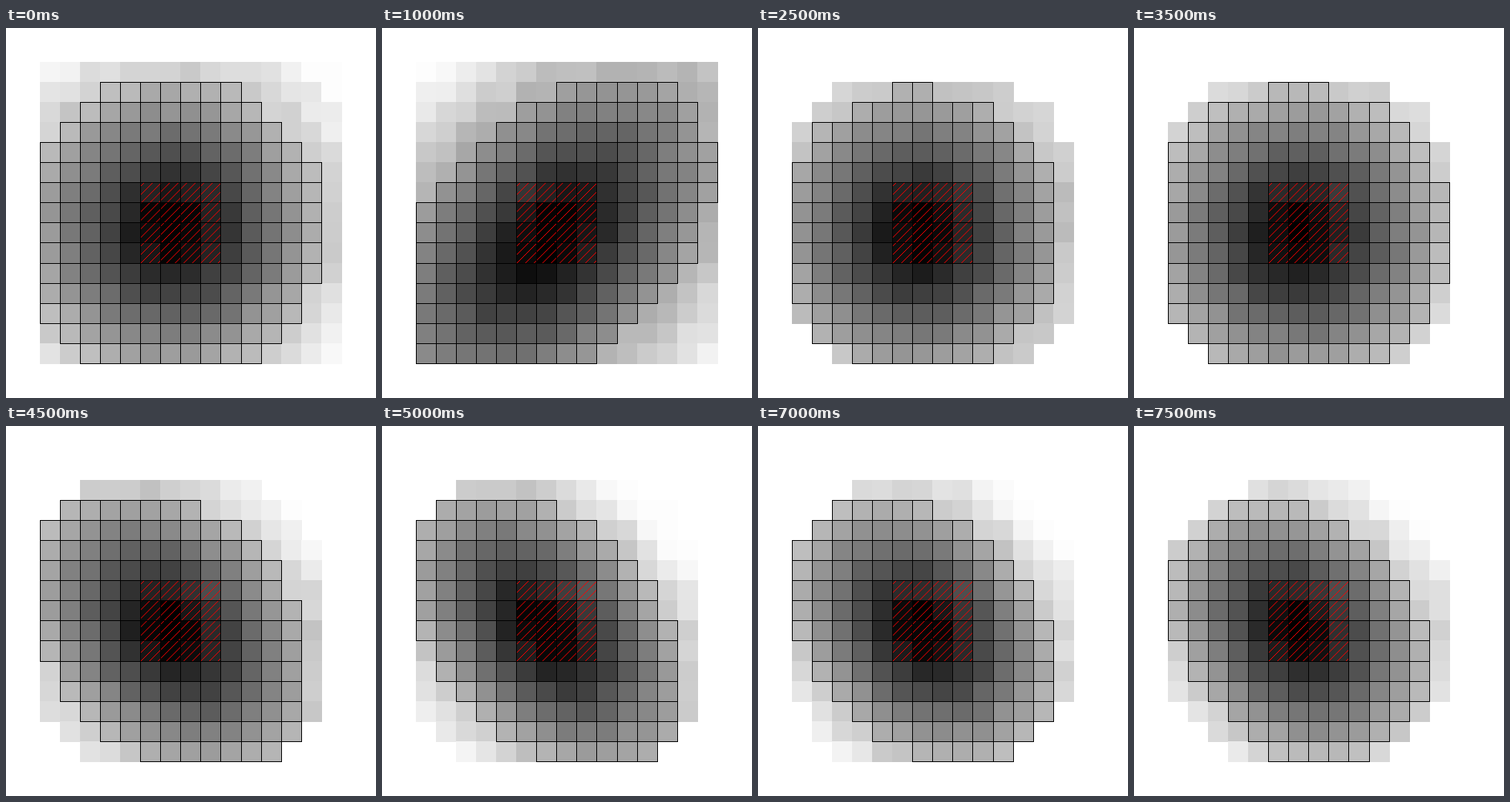
An HTML page with a canvas that plays this animation: 480 by 480 pixels, repeating every 8000 ms.

```html
<!DOCTYPE html>
<html lang="en">
<head>
<meta charset="utf-8">
<title>Pixel brightness</title>
<style>
  html, body { margin: 0; width: 100%; height: 100%; overflow: hidden; background: #fff; }
  canvas { display: block; }
</style>
</head>
<body>
<canvas id="stage" width="480" height="480"></canvas>
<script>
const ctx = document.getElementById('stage').getContext('2d');
const SIZE = 15, STEP_MS = 500, STEPS = 16;
const HATCH_GAP = 100 / 9;

// x, y: darkest point; fall, rise: steepness along the "\" and "/" diagonals;
// limit: lightest outlined grey; reach: radius of the drawn area
const poses = [
  { step: 0, x: 6.1, y: 7.8, fall: 1.05, rise: 1.05, limit: 192, reach: 20 },
  { step: 2, x: 6.2, y: 8.3, fall: 1.15, rise: .72, limit: 165, reach: 20 },
  { step: 5, x: 5.9, y: 8, fall: 1.06, rise: 1.06, limit: 182, reach: 8.1 },
  { step: 7, x: 6, y: 8.1, fall: 1.07, rise: 1.07, limit: 192, reach: 8.1 },
  { step: 10, x: 6, y: 8, fall: .92, rise: 1.45, limit: 187, reach: 8.1 },
  { step: 12, x: 6, y: 8, fall: .92, rise: 1.42, limit: 188, reach: 8.1 },
  { step: 15, x: 6, y: 8, fall: 1.12, rise: 1.4, limit: 193, reach: 7.5 }
];

const lerp = (a, b, k) => a + (b - a) * k;
const pos = i => Math.floor(44 + 26.1 * i);

function noise(a, b, c) {
  const n = Math.sin(a * 12.9898 + b * 78.233 + c * 37.719 + 1) * 43758.5453;
  return n - Math.floor(n);
}

function poseAt(step) {
  const next = Math.max(1, poses.findIndex(p => p.step >= step));
  const a = poses[next - 1], b = poses[next];
  const k = (step - a.step) / (b.step - a.step);
  return Object.fromEntries(Object.keys(a).map(key => [key, lerp(a[key], b[key], k)]));
}

function inArea(pose, row, col) {
  if (pose.reach > 10) return true;
  return row > 0 && col < SIZE - 1 && Math.hypot(col - 6.4, row - 7.7) < pose.reach;
}

// Grey grows evenly with distance, then more slowly in the pale surroundings.
function tone(pose, row, col) {
  const dx = col - pose.x, dy = row - pose.y;
  const dist = Math.hypot((dx + dy) * pose.fall, (dx - dy) * pose.rise) / Math.SQRT2;
  const grain = (noise(row, col, 0) + noise(row, col, pose.step + 1) - 1) * 8;
  const value = Math.max(6, 28 * (dist - 1));
  if (value < pose.limit) return Math.max(0, Math.min(value + grain, pose.limit - 1));
  return Math.min(253, pose.limit + 10 + (value - pose.limit) * .6 + grain * 1.5);
}

function drawHatch() {
  const x0 = pos(5), x1 = pos(9), y0 = pos(6), y1 = pos(10);
  ctx.save();
  ctx.beginPath();
  ctx.rect(x0, y0, x1 - x0, y1 - y0);
  ctx.clip();
  ctx.beginPath();
  for (let sum = 480 - 10 * HATCH_GAP; sum < x1 + y1; sum += HATCH_GAP) {
    ctx.moveTo(sum - y0, y0);
    ctx.lineTo(sum - y1, y1);
  }
  ctx.strokeStyle = '#f00';
  ctx.stroke();
  ctx.restore();
}

function draw(step) {
  const pose = poseAt(step);
  const outlines = [];

  ctx.fillStyle = '#fff';
  ctx.fillRect(0, 0, 480, 480);
  for (let row = 0; row < SIZE; row++) {
    for (let col = 0; col < SIZE; col++) {
      const grey = tone(pose, row, col);
      const outlined = grey < pose.limit;
      if (!inArea(pose, row, col)) continue;
      const x = pos(col), y = pos(row), w = pos(col + 1) - x, h = pos(row + 1) - y;
      ctx.fillStyle = `rgb(${grey},${grey},${grey})`;
      ctx.fillRect(x, y, w + 1, h + 1);
      if (outlined) outlines.push([x + .5, y + .5, w, h]);
    }
  }
  drawHatch();
  ctx.strokeStyle = '#000';
  outlines.forEach(box => ctx.strokeRect(...box));
}

let shown = -1;
function tick() {
  const step = Math.floor(performance.now() / STEP_MS) % STEPS;
  if (step !== shown) draw(shown = step);
  requestAnimationFrame(tick);
}
tick();
</script>
</body>
</html>
```
